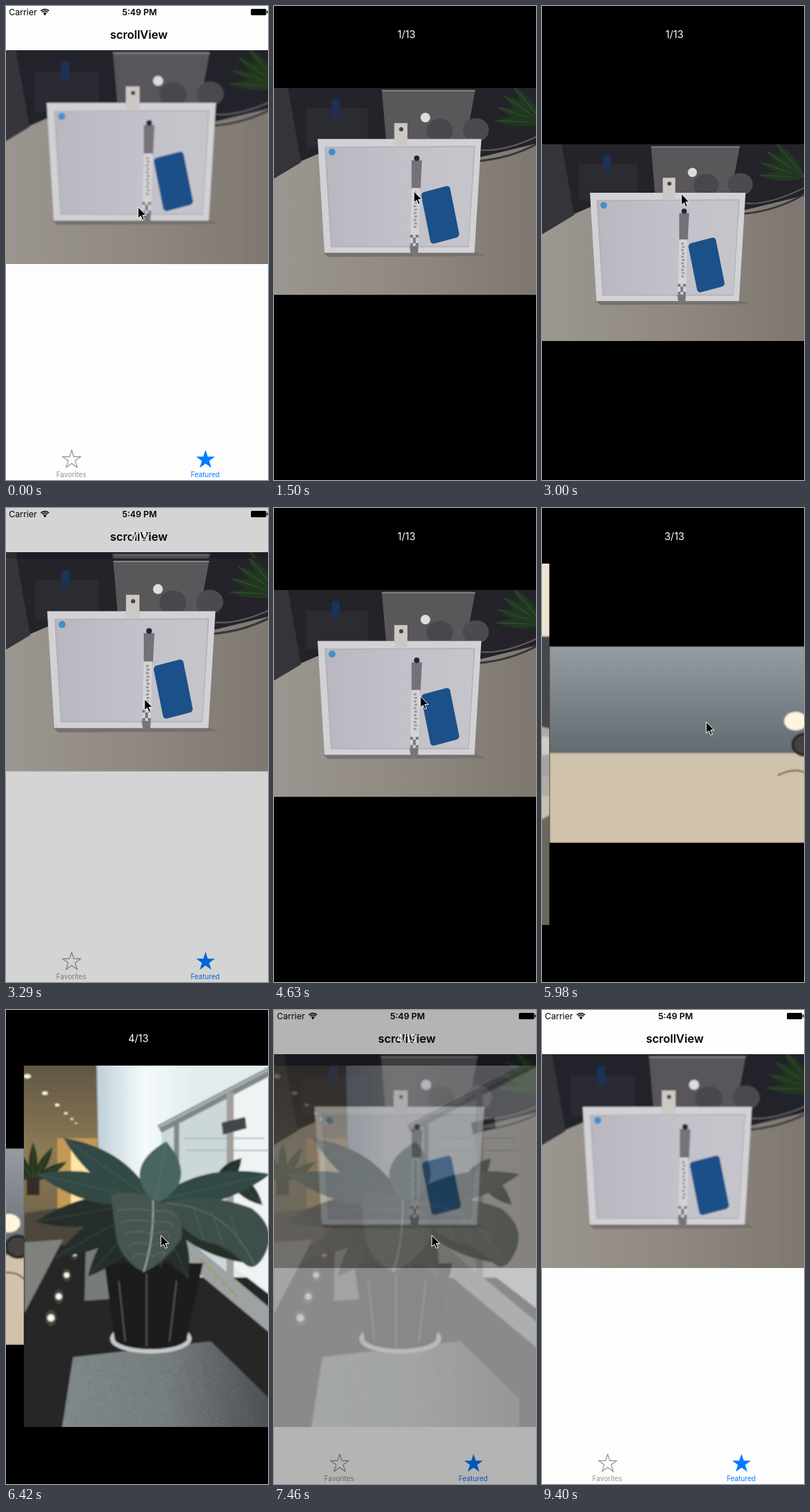
Recreate the animation shown at these times as an HTML page. Size 367 by 665 pixels, loop 9.82 s.

```html
<!DOCTYPE html>
<html lang="en">
<head>
<meta charset="utf-8">
<title>scrollView</title>
<style>
  html, body { margin: 0; width: 100%; height: 100%; overflow: hidden; background: #fdfdfd; }
  svg { display: block; width: 100%; height: 100%; }
  text { font-family: Inter, Roboto, sans-serif; }
</style>
</head>
<body>
<svg id="stage" viewBox="0 0 367 665"></svg>
<script>
const W = 367, STEP = 149, LOOP = 9820;

// Shape helpers
const poly = (points, fill) => `<polygon points="${points}" fill="${fill}"/>`;
const rect = (x, y, w, h, fill, extra = '') =>
  `<rect x="${x}" y="${y}" width="${w}" height="${h}" fill="${fill}" ${extra}/>`;
const oval = (x, y, rx, ry, fill, extra = '') =>
  `<ellipse cx="${x}" cy="${y}" rx="${rx}" ry="${ry}" fill="${fill}" ${extra}/>`;
const line = (d, color, width = 1, extra = '') =>
  `<path d="${d}" fill="none" stroke="${color}" stroke-width="${width}" ${extra}/>`;
const text = (x, y, size, fill, label, extra = '') =>
  `<text x="${x}" y="${y}" font-size="${size}" fill="${fill}" ${extra}>${label}</text>`;
const gradient = (id, direction, ...colors) =>
  `<linearGradient id="${id}" x2="${direction === 'h' ? 1 : 0}" y2="${direction === 'v' ? 1 : 0}">` +
  colors.map((c, i) => `<stop offset="${i / (colors.length - 1)}" stop-color="${c}"/>`).join('') +
  '</linearGradient>';
const clip = (id, x, y, w, h) => `<clipPath id="${id}">${rect(x, y, w, h, '#000')}</clipPath>`;
const repeat = (count, make) => Array.from({ length: count }, (_, i) => make(i)).join('');

let seed = 11;
const random = (min, max) => {
  seed = seed * 16807 % 2147483647;
  return min + (max - min) * seed / 2147483647;
};

// A pointed leaf with a midrib, growing from (x, y) at an angle in degrees
function leaf(x, y, angle, length, width, fill) {
  const w = width, l = length;
  return `<g transform="translate(${x} ${y}) rotate(${angle})">` +
    `<path d="M0 0Q${l * .45} ${w} ${l} 0Q${l * .45} ${-w} 0 0" fill="${fill}"/>` +
    line(`M0 0H${l}`, '#ffffff20') + '</g>';
}

function star(x, y, r, extra) {
  const points = Array.from({ length: 10 }, (_, i) => {
    const a = i * Math.PI / 5, q = i % 2 ? r * .39 : r;
    return `${x + q * Math.sin(a)},${y - q * Math.cos(a)}`;
  });
  return `<polygon points="${points.join(' ')}" ${extra}/>`;
}

const photo = (clipId, dx, ...parts) =>
  `<g clip-path="url(#${clipId})"><g filter="url(#soft)" transform="translate(${dx} 0)">${parts.join('')}</g></g>`;

const whiteboard = photo('wide', 0,
  rect(-20, 60, 410, 305, '#232329'),
  poly('-17,190 57,158 294,162 384,140 384,364 -17,364', 'url(#table)'),
  poly('-17,62 14,62 33,170 -17,200', '#34343a'),
  rect(40, 92, 90, 56, '#2b2b32'), rect(77, 78, 12, 26, '#1c3154', 'rx="4"'),
  poly('150,66 285,66 272,136 156,136', '#59575a'), line('M150 66H285', '#858388', 2),
  oval(213, 105, 7, 7, '#dddcdf'),
  oval(234, 124, 19, 17, '#49464c'), oval(286, 123, 19, 17, '#4c494f'),
  repeat(4, i => leaf(384, 112, 182 + i * 16, 70, 14, '#20381f')),
  line('M290 168Q340 164 384 138', '#38363b', 3), line('M294 152Q330 155 384 128', '#605e64', 2),
  poly('65,300 286,300 300,306 72,307', '#77716c'),
  poly('57,136 294,136 284,301 67,301', '#d2d1d6'),
  poly('67,147 285,146 276,293 76,293', '#b3b2ba'),
  poly('70,149 283,148 275,291 78,291', 'url(#board)'),
  rect(168, 113, 19, 34, '#ccc8c4'), oval(178, 122, 3, 3, '#45413f'),
  oval(78, 155, 5, 5, '#438fcb'),
  poly('193,167 208,167 206,208 193,208', '#747278'), oval(200.5, 164, 4, 4, '#28252e'),
  poly('193,207 205,207 203,292 191,292', '#d5d3d6'),
  repeat(11, i => rect(196 + i % 2, 212 + i * 5, 4, 3, '#9a98a0')),
  repeat(6, i => rect(191 + i % 3 * 4, 275 + i % 2 * 4 + (i > 2) * 8, 4, 4, '#77747a')),
  poly('190,291 203,291 202,303 197,306 192,303', '#77757a'),
  rect(-21, -39, 42, 78, '#1c5088', 'rx="5" transform="translate(234.5 246) skewY(-8) rotate(-7) skewX(4)"'));

const greens = ['#3f6533', '#567c43', '#6b9052', '#33552a'];
const bottle = photo('tall', -25,
  rect(20, 75, 380, 515, '#c9c7bb'),
  rect(20, 75, 210, 190, '#fbfbf8'), rect(20, 240, 145, 22, '#efe9dd'),
  rect(225, 75, 53, 230, '#dbd5cb'), rect(263, 75, 4, 220, '#c6c0b5'),
  rect(278, 75, 120, 220, 'url(#curtain)'),
  rect(160, 245, 240, 160, '#b1aca4'),
  poly('282,187 344,197 343,300 282,290', '#4c4d51'), poly('357,180 394,180 394,310 354,300', '#45474c'),
  poly('290,310 394,322 394,355 290,345', '#d0cbc4'), poly('318,358 394,345 394,378 350,370', '#a5a4a5'),
  // Planter box and log
  rect(20, 262, 145, 178, '#5d7a4b'),
  poly('150,300 275,330 275,480 150,470', '#74786a'),
  poly('270,362 394,425 394,445 330,450 270,475', '#4a5140'),
  poly('270,360 394,418 394,442 275,384', '#cbc7bc'),
  poly('25,420 60,400 185,510 185,590 150,590', '#bbb8ab'),
  poly('185,512 394,414 394,590 185,590', 'url(#fence)'),
  poly('180,500 268,470 394,402 394,430 228,520 185,515', '#c5c1b5'),
  repeat(4, i => line(`M${232 + i * 43} ${520 - i * 21}V590`, '#77756a', 2)),
  poly('20,470 95,560 180,585 20,590', '#cbc9bd'),
  line('M48 447L120 531', '#bab8ab', 56, 'stroke-linecap="round"'),
  line('M52 437L122 516', '#cac8bc', 18, 'stroke-linecap="round"'),
  oval(120, 531, 26, 40, '#aeac9f', 'transform="rotate(10 120 531)"'),
  repeat(16, i => leaf(random(95, 165), 280 + i * 6, 180 + random(-22, 32), random(60, 100),
    random(28, 46), greens[i % 4])),
  leaf(165, 385, 154, 134, 48, '#3f6630'),
  repeat(2, i => leaf(277, 305 + i * 35, 70 - i * 30, 40, 24, '#5f933f')),
  // Glass
  `<path d="M167 222H279L280 245V470Q278 510 222 514Q166 510 162 470V245Z" fill="#d2d1c9" fill-opacity=".42" stroke="#dddcd5" stroke-width="2"/>`,
  `<path d="M180 255H262L268 275V470Q264 490 222 490Q179 490 175 470V275Z" fill="#8d8b81" fill-opacity=".32" stroke="#d8d7cf" stroke-width="1.5"/>`,
  rect(180, 255, 83, 26, '#a3a097'), rect(212, 233, 42, 20, '#b5b2aa'),
  line('M168 232V480M274 232V480', '#eceae4', 3, 'opacity=".7"'),
  line('M170 228H278M172 255H270', '#e4e2dc', 3),
  rect(163, 171, 120, 50, 'url(#metal)', 'rx="3"'), line('M163 209H283', '#858586'),
  oval(215, 473, 37, 15, '#bdbbb2', 'stroke="#e4e2da" stroke-width="2"'),
  oval(218, 499, 46, 10, 'none', 'stroke="#d5d3ca" stroke-width="3"'),
  repeat(5, i => leaf(224, 370, i * 72 - 90, 26, 18, '#c4c3ba')),
  oval(220, 335, 12, 10, '#b7b6ad'), oval(190, 403, 12, 13, '#aaa99f'),
  poly('201,406 240,404 242,431 203,434', '#cbc6b9'),
  text(216, 414, 6, '#68645d', 'Sweet'), text(216, 424, 6, '#68645d', 'home'));

const desk = photo('page3', 0,
  rect(0, 194, W, 276, '#d1c3ab'), rect(0, 194, W, 150, 'url(#dusk)'),
  oval(345, 299, 16, 13, '#fff4dd'),
  oval(358, 332, 17, 15, '#45423e', 'stroke="#25282b" stroke-width="4"'),
  line('M320 375Q350 360 367 378', '#514a41', 2));

// Leaves spread around a crown, longest towards the sides
const crownLeaf = angle => {
  const a = angle * Math.PI / 180;
  return leaf(205, 268, angle, 85 + 85 * Math.abs(Math.cos(a)), 40, Math.sin(a) < 0 ? '#324a45' : '#252e2a');
};
const plant = photo('tall', -24,
  rect(20, 75, 375, 515, '#282828'),
  rect(20, 75, 108, 245, 'url(#hall)'),
  rect(70, 180, 56, 98, '#c49a54'), rect(89, 190, 29, 85, '#ffe6a8'),
  poly('24,285 125,270 125,330 24,330', '#4b463c'),
  repeat(6, i => oval(104 - 80 * .68 ** i * -1 - 80, 0, 0, 0, 'none') +
    oval(110 - 82 * .7 ** i, 172 - 79 * .7 ** i, 5 * .8 ** i, 3 * .8 ** i, '#fff7d8')),
  repeat(5, i => leaf(36, 240, -150 + i * 30, 55, 12, '#28371f')), rect(27, 235, 18, 25, '#302d26'),
  poly('24,326 78,322 24,425', '#7f817d'),
  poly('125,75 260,75 260,320 130,320', 'url(#column)'),
  rect(258, 75, 135, 300, '#e3ebec'), poly('316,120 394,80 394,420 316,360', '#eff3f3'),
  poly('216,170 310,120 310,380 216,330', '#cbd7d9'),
  line('M248 180H360M250 197H367', '#aebcbe', 2),
  line('M213 167L394 72', '#7f8789', 12), line('M213 164L394 69', '#aeb6b8', 3),
  line('M312 115V400', '#a3a09b', 10), line('M237 160V300', '#7d8587', 7),
  poly('300,158 333,150 335,166 302,175', '#41474a'),
  poly('250,320 394,440 394,475 250,355', '#9da3a3'),
  line('M270 350L322 402', '#a8945c', 3, 'stroke-dasharray="10 4"'),
  poly('110,320 150,318 150,405 108,408', '#777b79'),
  poly('92,487 285,465 367,545 367,590 76,590', 'url(#stone)'),
  repeat(500, () => {
    const y = random(490, 585);
    return rect(random(92 - (y - 487) * .16, 290 + (y - 470) * .6), y, 1.5, 1.5, random(0, 1) < .5 ? '#a5abac70' : '#4a4e4f70');
  }),
  repeat(5, i => oval(61 + i * 11, 432 - i * 30, 8 - i, 11 - i, '#8b887850') +
    oval(61 + i * 11, 432 - i * 30, 5 - i * .6, 5 - i * .6, '#fffbea')),
  oval(201, 461, 54, 18, '#202321', 'stroke="#c3cac9" stroke-width="6"'),
  poly('136,355 274,355 252,458 236,472 166,472 150,460', '#1d1b1b'),
  line('M156 380L165 465M195 370V472M237 380L227 465', '#6a6258', 1.5),
  leaf(310, 228, 44, 66, 22, '#273733'), leaf(290, 250, -48, 57, 22, '#22302c'),
  [170, 193, 131, 150, 34, 66, 84, 215, 347].map(crownLeaf).join(''),
  leaf(207, 272, -80, 89, 58, '#49655f'),
  `<path d="M221 270Q285 255 342 278Q378 305 362 340Q348 370 332 356Q310 330 280 326Q245 315 221 270Z" fill="#3c504b"/>`,
  line('M222 271Q310 275 346 358', '#6f837c'),
  repeat(3, i => line(`M${260 + i * 26} ${276 + i * 5}l15 46`, '#566b65')),
  `<path d="M145 260Q180 250 205 267Q250 275 244 320Q222 354 191 368Q153 348 151 307Z" fill="#46544f"/>`,
  line('M204 267Q206 320 191 367', '#a1afa7', 2),
  repeat(5, i => line(`M${153 + i * 6} ${282 + i * 17}Q175 ${276 + i * 15} 204 ${282 + i * 16}Q230 ${280 + i * 13} ${239 - i * 6} ${292 + i * 14}`, '#6a7973')));

const wifi = [2.8, 5.4, 8].map(r =>
  line(`M${54.5 - r * .71} ${12.5 - r * .71}A${r} ${r} 0 0 1 ${54.5 + r * .71} ${12.5 - r * .71}`, '#000', 1.6)).join('') +
  oval(54.5, 11.8, 1.3, 1.3, '#000');
const middle = 'text-anchor="middle"';

const home = [
  rect(0, 0, W, 665, '#fdfdfd'), whiteboard,
  text(4, 13, 12, '#000', 'Carrier'), wifi,
  text(187, 13, 12, '#000', '5:49 PM', `${middle} font-weight="600"`),
  rect(343, 4, 21.5, 9, '#000', 'rx="1.5"'), rect(365.3, 6.5, 1.4, 4, '#000', 'rx=".7"'),
  text(186, 46, 16, '#000', 'scrollView', `${middle} font-weight="600"`),
  star(92, 636.5, 13.2, 'fill="none" stroke="#929292" stroke-width="1.2"'),
  star(279.5, 636.5, 13.8, 'fill="#007aff"'),
  text(91.5, 661, 9.7, '#929292', 'Favorites', middle),
  text(279, 661, 9.7, '#007aff', 'Featured', middle)
].join('');

stage.innerHTML = `<defs>
  <filter id="soft" x="-5%" y="-5%" width="110%" height="110%"><feGaussianBlur stdDeviation=".8"/></filter>
  ${clip('wide', -16.5, 62, 400, 300)}${clip('tall', 0, 78, W, 507)}${clip('page3', 0, 194, W, 276)}
  ${gradient('table', 'h', '#9c9790', '#8f8982', '#7d766f')}
  ${gradient('board', 'h', '#b9b8c0', '#c2c1c9', '#c6c5cc')}
  ${gradient('curtain', 'h', '#f3ecdf', '#ece2d0')}
  ${gradient('fence', 'h', '#aba89b', '#67655b')}
  ${gradient('metal', 'h', '#8f9092', '#c8c8c8', '#a0a0a1', '#bababa', '#858688')}
  ${gradient('dusk', 'v', '#969da2', '#626b70')}
  ${gradient('hall', 'v', '#5f5646', '#8d7a56', '#6d6047')}
  ${gradient('column', 'h', '#bfd0d9', '#f5fbfd', '#e4edf0')}
  ${gradient('stone', 'h', '#80888a', '#767d7f', '#4c5051')}
  </defs>
  <g>${home}</g>
  <g id="viewer">
    <rect id="shade" width="${W}" height="665"/>
    <g id="pages"><g id="first">${whiteboard}</g>
      ${[bottle, desk, plant].map((p, i) => `<g transform="translate(${(i + 1) * W} 0)">${p}</g>`).join('')}</g>
    <text id="counter" x="185.5" y="45" font-size="14" fill="#fff" ${middle}></text>
  </g>
  <path id="cursor" d="M0 0V16L3.7 12.6L6.2 18.3L8.7 17.3L6.3 11.6H11.2Z" stroke="#fff"/>`;

// Motion: each visit opens the viewer, swipes some pages and closes it
const visits = [
  { open: 1360, swipes: [], close: 3026 },
  { open: 4489, swipes: [5029, 5600, 6072], close: 7237 }
];
const cursorMoves = [ // start, x, y
  [0, 185, 282], [300, 196, 260], [2850, 194, 268], [3590, 205, 264], [5060, 178, 284],
  [5590, 230, 300], [6110, 217, 316], [7160, 221, 316], [7900, 206, 296], [8800, 347, 631]
];
const progress = (t, start, duration) => Math.min(1, Math.max(0, (t - start) / duration));
const smooth = p => p * p * (3 - 2 * p);

function cursorAt(t) {
  return cursorMoves.reduce(([x, y], [start, toX, toY]) => {
    const p = smooth(progress(t, start, 290));
    return [x + (toX - x) * p, y + (toY - y) * p];
  }, cursorMoves[0].slice(1));
}

function draw(time) {
  const t = Math.floor(time % LOOP / STEP) * STEP;
  const visit = t < visits[1].open ? visits[0] : visits[1];
  const closing = progress(t, visit.close, 300);
  const dark = t < visit.open ? 0 : 1 - closing;
  const page = visit.swipes.reduce((sum, start) => sum + smooth(progress(t, start, 400)), 0);
  const zoom = smooth(progress(t, visit.open, 300)) - smooth(closing);

  viewer.setAttribute('display', dark > 0 ? 'inline' : 'none');
  shade.setAttribute('opacity', dark);
  pages.setAttribute('opacity', page ? dark : 1);
  pages.setAttribute('transform', `translate(${-page * W} 0)`);
  first.setAttribute('transform',
    `translate(183.5 ${212 + 120 * zoom}) scale(${1 - .08 * zoom}) translate(-183.5 -212)`);
  if (page) first.setAttribute('transform', 'translate(183.5 332) scale(.92) translate(-183.5 -212)');
  counter.textContent = `${Math.round(page) + 1}/13`;
  cursor.setAttribute('transform', `translate(${cursorAt(t)})`);
  cursor.setAttribute('display', t < 63 * STEP ? 'inline' : 'none');
}

const start = performance.now();
(function loop() {
  draw(performance.now() - start);
  requestAnimationFrame(loop);
})();
</script>
</body>
</html>
```
